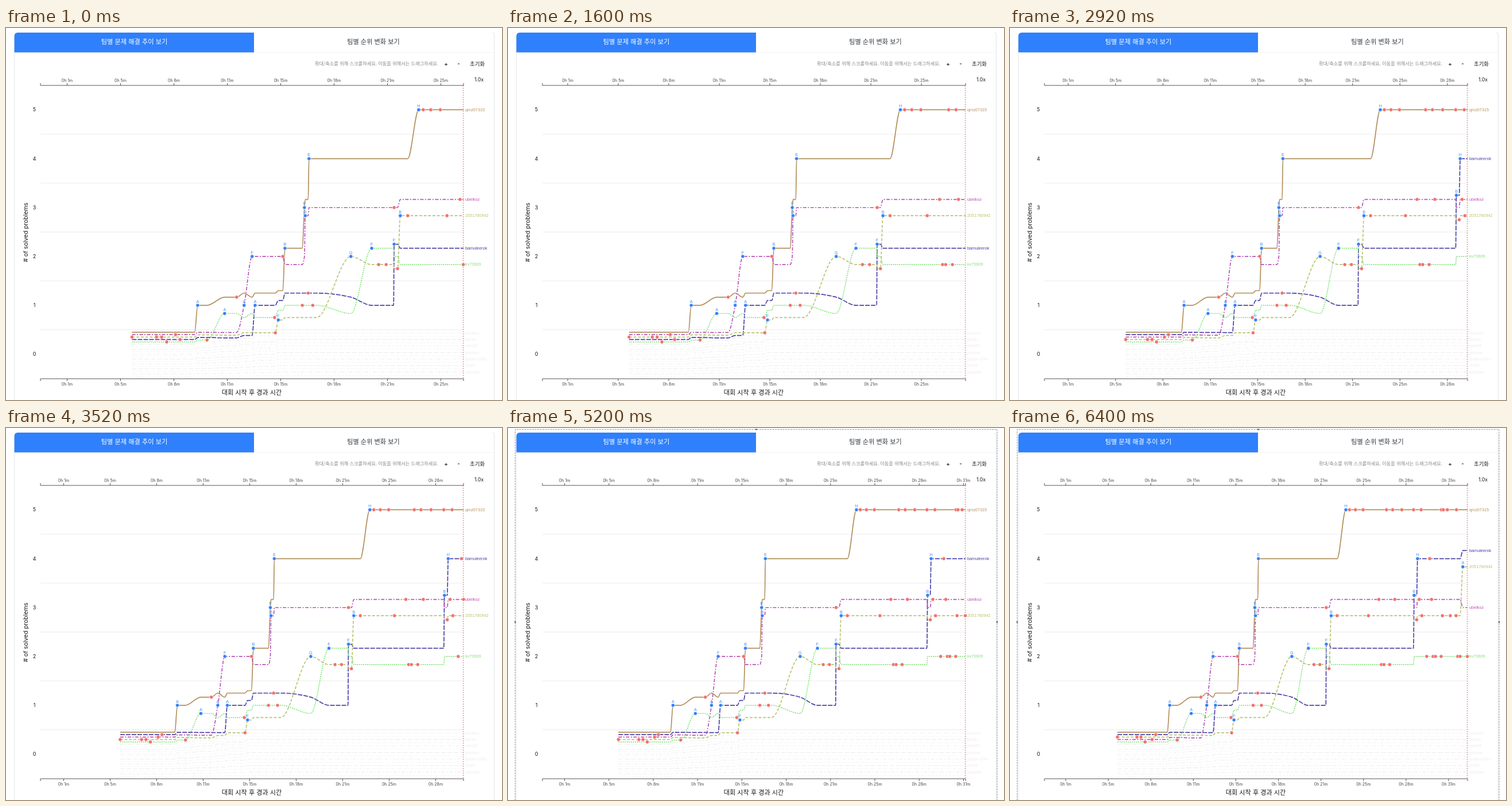
These frames come from a looping animation (864x648 px, 6.92 s). An HTML page:

```html
<!DOCTYPE html>
<html lang="ko">
<head>
<meta charset="utf-8">
<title>팀별 문제 해결 추이</title>
<style>
  html, body { margin: 0; width: 100%; height: 100%; overflow: hidden; background: #fff; }
  svg { display: block; width: 864px; height: 648px; }
  text { font-family: Inter, "Noto Sans CJK KR", "Noto Sans CJK", sans-serif; fill: #161616; }
  .ko { font-family: "Noto Sans CJK KR", "Noto Sans CJK", "Noto Sans", sans-serif; }
  .mid { text-anchor: middle; }
  .tick { font-size: 7px; fill: #444; text-anchor: middle; }
  .name, .mark { font-family: "Liberation Sans", Arial, sans-serif; font-size: 7.3px; }
  .mark { fill: #4a8df0; text-anchor: middle; }
  .line { fill: none; stroke-width: 1.7; }
  .faint { stroke-width: 1.1; }
</style>
</head>
<body>
<svg viewBox="0 0 864 648">
  <defs><clipPath id="plot"><rect x="60" y="100" width="737" height="511"/></clipPath></defs>
  <path d="M14.5 648V14M850.5 648V14q0-4-3-6" fill="none" stroke="#e6e7ea" stroke-width="1.2"/>
  <path d="M432 42.5H850" stroke="#f3f4f6"/>
  <path d="M14.6 42.6V14q0-6 6-6H432V42.6z" fill="#2f80fc"/>
  <text class="ko mid" x="223.5" y="28" font-size="11.2" font-weight="500" style="fill:#fff">팀별 문제 해결 추이 보기</text>
  <text class="ko mid" x="640" y="28" font-size="11.2" font-weight="500" style="fill:#333a45">팀별 순위 변화 보기</text>
  <text class="ko" x="538" y="65" font-size="8.2" style="fill:#888">확대/축소를 위해 스크롤하세요. 이동을 위해서는 드래그하세요.</text>
  <text class="mid" x="766.5" y="65.5" font-size="10" font-weight="500">+</text>
  <text class="mid" x="788.5" y="65.5" font-size="10" font-weight="500">-</text>
  <text class="ko" x="808" y="65.5" font-size="9.4">초기화</text>
  <text x="816" y="93" font-size="8.7">1.0x</text>
  <text class="mid" font-size="10.4" transform="translate(38 356) rotate(-90)"># of solved problems</text>
  <text class="ko mid" x="428" y="639" font-size="11.1">대회 시작 후 경과 시간</text>
  <g id="grid"></g>
  <g id="lines" clip-path="url(#plot)"></g>
  <path d="M796.5 100V611" stroke="#dc746e" stroke-dasharray="2 2"/>
  <path d="M60 96V100H797V96M60 615V611H797V615" fill="none" stroke="#555"/>
  <g id="ticks"></g>
  <g id="dots"></g>
  <g id="names"></g>
  <g id="frame">
    <path d="M12.5 648V2.5H852V648" fill="none" stroke="#8b8b8b" stroke-dasharray="3 1.5" stroke-width=".9"/>
    <path d="M431 2.5h3M12.5 336.5v3M852 336.5v3" stroke="#555" stroke-width="2"/>
  </g>
</svg>
<script>
const LOOP = 6920, STEP = 40, LEFT = 60, WIDTH = 737;
const OPENING = 343, CLOSING = 2100;

// [ms, contest second at the right edge]
const CLOCK = [[480, 1585], [960, 1608], [2320, 1750], [3520, 1820], [4640, 1872], [6400, 1989]];

// Contest seconds of solved problems and rejected tries; list order breaks ties
const solvers = [
  { name: 'qmz07315', color: '#b28f5c', dash: 'none',
    solved: { A: 589, B: 916, F: 989, E: 1006, H: 1417 },
    rejected: [735, 1434, 1462, 1498, 1608, 1637, 1680, 1735, 1771, 1866, 1875, 1894, 1937] },
  { name: 'bamuleerok', color: '#4a43a8', dash: '8 2',
    solved: { A: 804, F: 1325, B: 1738, H: 1754 },
    rejected: [523, 1003, 1811] },
  { name: 'ubelkoz', color: '#b953b9', dash: '6 2.5 2 2.5',
    solved: { A: 763, F: 793, B: 992 },
    rejected: [506, 908, 1325, 1572, 1647, 1762, 1820] },
  { name: 'kv73609', color: '#84e37d', dash: '2 1.6',
    solved: { A: 690, F: 1241 },
    rejected: [473, 624, 877, 981, 1020, 1584, 1596, 1623, 1797, 1827, 1838, 1865, 1943, 1954, 1988] },
  { name: '2051760942', color: '#b9c470', dash: '5 2.7',
    solved: { F: 891, G: 1163, B: 1348, A: 1967 },
    rejected: [343, 435, 454, 880, 1267, 1295, 1338, 1376, 1523, 1750, 1774, 1871, 1908, 1935] }
];
const faintNames = ['hovenu', 'tamiro', 'zelu55', 'pokiran', 'yudem2041', 'rinsol', 'wabeko'];
const faintDashes = ['6 3 2 3', '3 3', '8 3', '5 2 2 2'];
const others = Array.from({ length: 14 }, (_, i) => ({
  name: i % 2 ? '' : faintNames[i / 2], color: i % 2 ? '#f4f4f4' : '#ededed',
  dash: faintDashes[i % 4], solved: {}, rejected: [], faint: true
}));
const teams = [...solvers, ...others];

// Every submission is a node of every line; three come from the faint teams
const times = [...new Set([OPENING, 578, 1034, 1323, CLOSING,
  ...solvers.flatMap(t => [...Object.values(t.solved), ...t.rejected])])].sort((a, b) => a - b);

const $ = id => document.getElementById(id);
function set(el, attrs) { for (const k in attrs) el.setAttribute(k, attrs[k]); }
function add(parent, tag, attrs, text = '') {
  const el = document.createElementNS('http://www.w3.org/2000/svg', tag);
  set(el, attrs);
  el.textContent = text;
  return parent.appendChild(el);
}
const show = (el, on) => { el.style.display = on ? '' : 'none'; };
const yOf = v => 568.2 - 85.15 * v;
const solvedBy = (team, t) => Object.values(team.solved).filter(s => s <= t + .5).length;

// Teams with equal counts spread evenly around the whole number
function heightAt(team, t, order) {
  const count = solvedBy(team, t);
  const tied = (count ? teams : order).filter(o => solvedBy(o, t) === count);
  return count + .5 - (tied.indexOf(team) + 1) / (tied.length + 1);
}

// Monotone cubic tangents
function tangents(p) {
  const n = p.length - 1, m = [];
  const h = i => p[i + 1][0] - p[i][0];
  const s = i => (p[i + 1][1] - p[i][1]) / h(i);
  for (let i = 1; i < n; i++) {
    const a = s(i - 1), b = s(i);
    const mean = (a * h(i) + b * h(i - 1)) / (h(i - 1) + h(i));
    m[i] = (Math.sign(a) + Math.sign(b)) * Math.min(Math.abs(a), Math.abs(b), Math.abs(mean) / 2);
  }
  m[0] = (3 * s(0) - m[1]) / 2;
  m[n] = (3 * s(n - 1) - m[n - 1]) / 2;
  return m;
}
function valueAt(p, m, t) {
  let i = 0;
  while (i < p.length - 2 && p[i + 1][0] < t) i++;
  const h = p[i + 1][0] - p[i][0], u = (t - p[i][0]) / h, w = 1 - u;
  return p[i][1] * w * w * (1 + 2 * u) + p[i + 1][1] * u * u * (3 - 2 * u)
    + h * u * w * (m[i] * w - m[i + 1] * u);
}
function curve(p, m, x) {
  const at = (t, v) => x(t).toFixed(2) + ' ' + yOf(v).toFixed(2);
  let d = 'M' + at(...p[0]);
  for (let i = 1; i < p.length; i++) {
    const [t0, v0] = p[i - 1], [t1, v1] = p[i], k = (t1 - t0) / 3;
    d += `C${at(t0 + k, v0 + k * m[i - 1])} ${at(t1 - k, v1 - k * m[i])} ${at(t1, v1)}`;
  }
  return d;
}

for (let v = 0; v <= 5; v++) {
  add($('grid'), 'text', { class: 'mid', x: 49.5, y: yOf(v) + 3, 'font-size': 9 }, String(v));
  if (v < 5) add($('grid'), 'path', { d: `M60 ${yOf(v + .5)}H797`, stroke: '#ececec' });
}

const ticks = Array.from({ length: 10 }, (_, i) => {
  const s = 100 + 200 * i, g = add($('ticks'), 'g', {});
  const label = `0h ${Math.floor(s / 60)}m`;
  add(g, 'path', { d: 'M0 96V100M0 611V615', stroke: '#555' });
  for (const y of [93.5, 622.5]) add(g, 'text', { class: 'tick', y }, label);
  return { s, g };
});

function makeDot(t, mark) {
  const fill = mark ? '#2f80fc' : '#f0706c';
  return {
    t,
    circle: add($('dots'), 'circle', { r: 3.1, fill, stroke: '#fff', 'stroke-width': .7 }),
    text: mark && add($('dots'), 'text', { class: 'mark' }, mark)
  };
}
// Faint teams go underneath
for (const team of [...others, ...solvers]) {
  team.line = add($('lines'), 'path', { class: team.faint ? 'line faint' : 'line',
    stroke: team.color, 'stroke-dasharray': team.dash });
  team.label = add($('names'), 'text', { class: 'name', x: 800, style: `fill:${team.color}` }, team.name);
  team.dots = [...team.rejected.map(t => makeDot(t)),
    ...Object.entries(team.solved).map(([mark, t]) => makeDot(t, mark))];
}

function clockAt(ms) {
  const i = CLOCK.findIndex(([end]) => ms <= end);
  if (i < 0) return CLOCK[CLOCK.length - 1][1];
  if (i === 0) return CLOCK[0][1];
  const [a, u] = CLOCK[i - 1], [b, v] = CLOCK[i];
  return u + (v - u) * (ms - a) / (b - a);
}

function draw(ms) {
  const now = clockAt(ms);
  const x = t => LEFT + WIDTH * t / now;
  for (const { s, g } of ticks) {
    show(g, s <= now);
    g.setAttribute('transform', `translate(${x(s)} 0)`);
  }

  // Teams without a solved problem line up by the current standing
  for (const team of teams) team.score = heightAt(team, now, teams);
  const order = [...teams].sort((a, b) => b.score - a.score);
  for (const team of teams) {
    const pts = times.map(t => [t, heightAt(team, t, order)]);
    const m = tangents(pts);
    team.line.setAttribute('d', curve(pts, m, x));
    team.label.setAttribute('y', yOf(valueAt(pts, m, now)) + 2.3);
    for (const { t, circle, text } of team.dots) {
      const on = t <= now + .5, cx = x(t), cy = yOf(valueAt(pts, m, t));
      show(circle, on);
      set(circle, { cx, cy });
      if (text) {
        show(text, on);
        set(text, { x: cx, y: cy - 4.3 });
      }
    }
  }
  show($('frame'), ms >= 5000);
}

const start = performance.now();
let last = -1;
function tick() {
  const t = Math.max(0, performance.now() - start) % LOOP;
  const ms = Math.floor(t / STEP) * STEP;
  if (ms !== last) draw(last = ms);
  requestAnimationFrame(tick);
}
tick();
</script>
</body>
</html>
```
